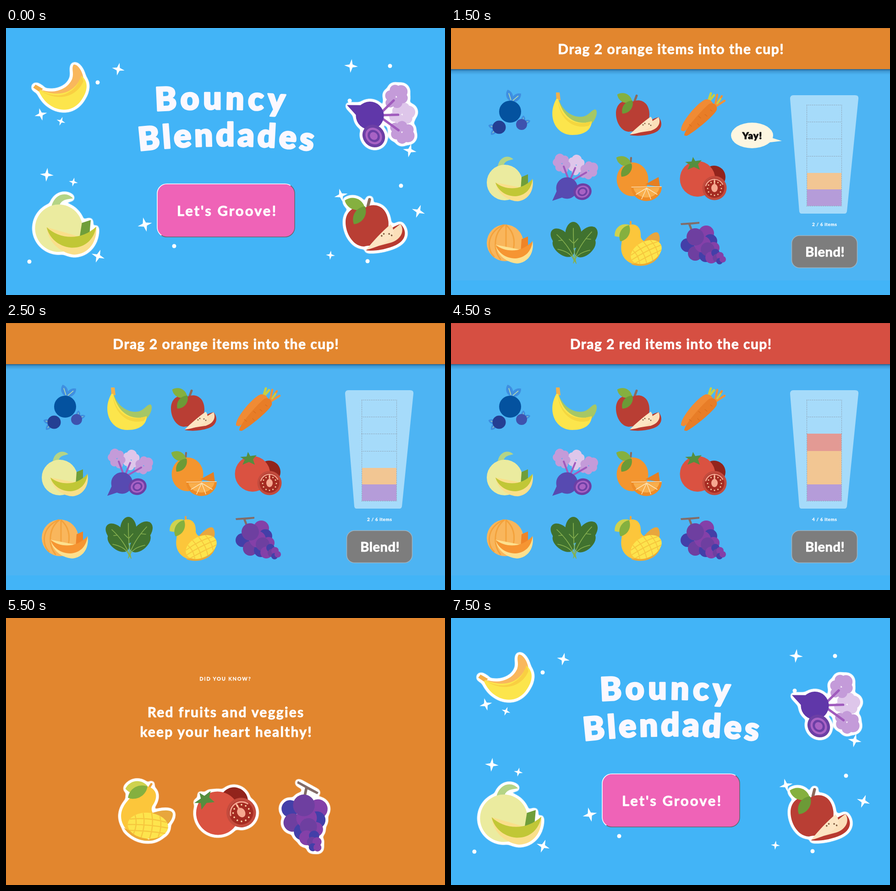
An HTML page that plays this animation: 958 px wide and 584 px high, repeating every 8 s.

```html
<!DOCTYPE html>
<html lang="en">
<head>
<meta charset="utf-8">
<title>Bouncy Blendades</title>
<style>
  html, body { margin: 0; width: 100%; height: 100%; overflow: hidden; background: #42b4f7; }
  svg { display: block; width: 958px; height: 584px; }
  text { font-family: Lato, sans-serif; font-weight: 700; text-anchor: middle;
         fill: #fff; stroke: #fff; stroke-width: .9; stroke-linejoin: round; }
  .title { font-size: 71px; font-weight: 900; fill: #fbf8fe; stroke: #fbf8fe; stroke-width: 3; }
  .small { stroke-width: .3; }
  .speech { font-weight: 900; fill: #111; stroke: #111; }
  .sticker { filter: url(#sticker); }
  .line { fill: none; stroke-linecap: round; }
</style>
</head>
<body>
<svg id="stage" viewBox="0 0 958 584"></svg>
<script>
const ORANGE = '#e2862e', WHITE = '#fff';

// Drawing helpers
const path = (d, fill, extra = '') => `<path d="${d}" fill="${fill}" ${extra}/>`;
const line = (d, color, width) => `<path class="line" d="${d}" stroke="${color}" stroke-width="${width}"/>`;
const ellipse = (x, y, rx, ry, fill, turn = 0) =>
  `<ellipse rx="${rx}" ry="${ry}" fill="${fill}" transform="translate(${x} ${y}) rotate(${turn})"/>`;
const circle = (x, y, r, fill) => ellipse(x, y, r, r, fill);
const rect = (x, y, w, h, fill, extra = '') =>
  `<rect x="${x}" y="${y}" width="${w}" height="${h}" fill="${fill}" ${extra}/>`;
const at = (x, y, turn, scale, body) =>
  `<g transform="translate(${x} ${y}) rotate(${turn}) scale(${scale})">${body}</g>`;
const text = (x, y, size, spacing, words, extra = '') =>
  `<text x="${x + spacing / 2}" y="${y}" font-size="${size}" letter-spacing="${spacing}" ${extra}>${words}</text>`;
const place = (id, x, y, turn = 0, scale = 1, style = '') =>
  at(x, y, turn, scale, `<use href="#${id}" style="${style}"/>`);
const sticker = (...args) => `<g class="sticker">${place(...args)}</g>`;
const star = ([x, y, r], i) =>
  at(x, y, [12, -14, 20, 6][i % 4], r, path('M0-1L.2-.24L1 0L.24.2L0 1L-.2.24L-1 0L-.24-.2Z', WHITE));
const leaf = (x, y, turn, half, width, fill) =>
  at(x, y, turn, 1, path(`M${-half} 0C${-half / 2} ${-width} ${half / 2} ${-width} ${half} 0C${half / 2} ${width} ${-half / 2} ${width} ${-half} 0Z`, fill));
const button = (x, y, w, h, r, fill, stroke) =>
  rect(x, y, w, h, fill, `rx="${r}" stroke="${stroke}" stroke-width="1.6"`);

// Produce, each drawn around its own centre
function blueberries() {
  const sprig = (x, y, turn, size) => at(x, y, turn, size,
    [-34, 34].map(a => at(0, 0, a, 1, leaf(0, -13, 90, 13, 9, '#3f8fe0') + line('M0-4V-18', '#b9dcae', 1.6))).join(''));
  return sprig(4, -26, 16, 1.05) + sprig(-28, 32, -105, .75) + sprig(29, 21, 38, .65) +
    circle(1, -4, 24, '#04529f') + circle(-23, 30, 14.5, '#243f93') + circle(26, 24, 12, '#3e52ae');
}

function banana() {
  return path('M-40-46h8l2 17h-9z', '#f3b04a') +
    path('M-34-32C-26-4 0 12 22 6C34 2 37-8 46-9C52-6 49 10 38 22C10 34-30 22-34-32Z', 'var(--back,#a6c765)') +
    path('M-39-32C-60 5-42 47-4 47C24 47 38 34 38 17C20 24-20 25-35-32Z', '#fce54c') +
    path('M-36-32C-30 10-4 22 20 21L38 17L32 27C-4 36-34 10-36-32Z', 'var(--shade,#f4d63f)');
}

const leafPair = (x, y) => leaf(x, y, 25, 18, 13, '#85b03f') + leaf(x + 6, y + 20, -52, 18, 12, '#6c9a37');

function apple() {
  return line('M-9-28L-5-39', '#8b6a5c', 5) +
    path('M-14-26C4-34 23-24 23 2C22 26 8 43-6 41C-12 39-17 39-22 40C-38 39-50 20-50 0C-50-23-32-33-14-26Z', '#b93e34') +
    leafPair(-31, -34) +
    path('M-20 47C0 30 24 12 43 8C53 20 51 36 32 43C15 49-6 50-20 47Z', '#b83a30') +
    path('M-14 44L43 8C49 20 42 34 24 38Z', '#fbdfb9') +
    path('M-20 46C-6 32 10 18 26 7C31 14 30 20 29 26C16 38-2 44-20 46Z', '#fde5c3') +
    [[9, 25], [13, 22], [22, 23], [26, 26]].map(([x, y]) => circle(x, y, 1.4, '#7e5a3d')).join('');
}

function carrots() {
  return line('M12-28L17-44M14-28L24-40', '#c9cf42', 5) +
    line('M26-16L31-41M27-16L41-38M27-15L47-28', '#f0923b', 4.5) + line('M31-22L38-32', '#c9cf42', 4) +
    path('M-48 37C-50 20-10-26 6-31C16-32 24-24 22-14C18 0-30 32-42 39Z', '#f08b34') +
    path('M-41 48C-42 36-5-5 12-20C22-27 32-18 30-8C24 6-24 44-36 49Z', '#e87d27') +
    line('M-10 6l5 4M-30 24l5 4M4 2l5 4M-12 22l4 4M16-8l4 3', '#d96e1d', 1.3);
}

const melonSlice = (dy, rind, flesh, end) => at(0, dy, 0, 1,
  path('M26-2L40-8V16L24 26Z', end) +
  path('M-31 10C-26 38 0 51 18 51C42 48 54 26 50 2C46 10 40 18 30 22Z', rind) +
  path('M-31 10C-10 27 26 29 50 2C48 24 34 39 12 40C-10 40-26 26-31 10Z', flesh));

function honeydew() {
  return path('M-26-26C-22-46-4-52 8-41C-2-38-10-38-13-28Z', '#b4d486') +
    circle(-11, 10, 39, '#ebeb9f') + melonSlice(0, '#fadf8a', '#c1c736', '#6f9e3a');
}

function cantaloupe() {
  return circle(-10, 0, 40, '#f9b65c') +
    line('M-12-39C-36-20-36 16-20 36M-8-39C14-20 14 10 0 34M-14-39C-54-20-48 18-34 30M-8-39V36', '#f3a23c', 3) +
    melonSlice(-6, '#fde08e', '#f69532', '#ef8427');
}

function beet() {
  const cloud = (x, y, turn, fill) => at(x, y, turn, 1,
    [[0, -12, 11], [-9, -7, 9], [9, -6, 9], [-8, 5, 9], [8, 6, 9], [0, 14, 8]].map(c => circle(...c, fill)).join(''));
  const root = 'var(--root,#574ab1)';
  return cloud(4, -28, 6, '#dec6ea') + cloud(-27, -31, -22, '#c49bd9') + cloud(31, -16, 56, '#c49bd9') +
    line('M-13 2L-23-25M-8 2L2-22M-5 6L26-12', '#a05bbd', 4) +
    path('M-38 28L-48 50L-24 42Z', root) + circle(-16, 22, 23.5, root) +
    ellipse(18, 30, 20, 18, '#6c3fa5', -20) + ellipse(18, 30, 15, 13, '#a862c4', -20) +
    ellipse(18, 30, 11, 9.5, '#6c3fa5', -20) + ellipse(18, 30, 7, 6, '#a862c4', -20);
}

function orange() {
  return line('M-18-33L-17-44', '#8b6a5c', 4) + ellipse(-14, 3, 34.5, 37, '#f3952f') + leafPair(-33, -37) +
    path('M14 14L43-2L46 20Z', '#e67f22') +
    path('M-17 20A33.5 31 0 0 0 50 19Z', '#ee8b26') + path('M-12 22A29 26 0 0 0 45 21Z', '#f9ae4c') +
    line('M17 22L-6 36M17 22L6 46M17 22L26 46M17 22L40 36M-16 20L49 19', '#fde3b4', 1.5);
}

function tomato() {
  let seeds = '';
  for (let i = 0; i < 12; i++) {
    const a = i * Math.PI / 6;
    seeds += circle(25 + 15 * Math.cos(a), 23 + 15 * Math.sin(a), 1.5, '#fbd3a8');
  }
  return circle(24, -2, 25, '#92241c') + ellipse(-12, 2, 38.5, 39, '#da5241') +
    path('M-22-46L-17-37L-3-39L-11-30L-7-18L-20-24L-34-18L-29-29L-39-35L-25-36Z', '#558e3e') +
    circle(25, 22, 26.5, '#c34b3d') + circle(25, 22, 21.5, '#a52b22') +
    line('M6 17A20 20 0 0 1 43 14', '#f3a08c', 2.5) + line('M25 22V4', '#f6a890', 3) +
    ellipse(25, 22, 7, 9, '#f6a890') + seeds;
}

function spinach() {
  const leaves = [[-24, 10, -52, 16, 27], [24, 10, 48, 16, 27], [-29, -9, -45, 17, 27], [28, -12, 42, 18, 28], [-2, -17, 0, 18, 29]];
  return leaves.map(([x, y, turn, rx, ry]) => ellipse(x, y, rx, ry, '#40722f', turn)).join('') +
    line('M-2-32Q-2 20 4 45M-38-18Q-8 10 2 42M38-24Q8 8-2 44M-36 14Q-6 20 0 40M34 16Q6 22 0 40M-3 0l-8-8M0 0l8-9M26-9l10 1M-26-6l-8 1', '#86b04f', 1.7);
}

function mango() {
  return line('M-18-46V-36', '#f0a33d', 4) + path('M8 0C20-16 40-32 44-18C48-8 44 6 36 12Z', '#e8a63d') +
    path('M-18-40C-2-42 5-30 4-14C6 0 24 0 42 0C52 16 30 48 6 49C-30 48-42 26-38 2C-36-10-34-34-18-40Z', '#fcc63b') +
    leaf(-37, -27, -38, 20, 15, '#cfd24e') + leaf(-31, -21, -62, 20, 13, '#85b03f') +
    path('M-18 46C10 58 46 44 48 14L30 40Z', '#eda934') +
    at(16, 20, -27, 1, ellipse(0, 0, 36, 23, '#fde44d') +
      line('M-24-16Q-18 0-24 16M-10-21Q-4 0-10 21M5-22Q11 0 5 22M20-18Q26 0 20 18M-32-9Q0-15 32-9M-35 1Q0-3 35 1M-31 11Q0 9 31 11', '#f6c63d', 2));
}

function grapes() {
  const tones = ['#8440a8', '#6e3fa0', '#433fa8'];
  const bunch = [[7, -21, 17, 0], [-34, 5, 15, 2], [16, -4, 15, 2], [-17, 23, 16, 1], [23, 11, 13, 0], [6, 27, 15, 2], [-1, 3, 18, 0],
    [-17, -13, 19, 1], [10, 14, 15, 1], [18, 32, 13, 0], [27, 22, 9, 2], [30, 33, 9, 1], [37, 28, 8, 0], [36, 40, 7, 2], [43, 36, 7, 0]];
  return path('M-49-43L-8-46V-42L-27-40L-22-27H-27L-32-40L-48-39Z', '#826c68') +
    bunch.map(([x, y, r, tone]) => circle(x, y, r, tones[tone])).join('');
}

const produce = { blueberries, banana, apple, carrots, honeydew, beet, orange, tomato, cantaloupe, spinach, mango, grapes };
const ripe = '--back:#f9b75c;--shade:#f9cf42';

// Scenes
function titleScene() {
  const stars = [[245, 90, 14], [76, 189, 14], [120, 204, 10], [89, 321, 15], [147, 337, 10], [303, 430, 16], [201, 499, 15],
    [753, 83, 15], [881, 268, 15], [731, 366, 15], [900, 401, 15], [708, 497, 10]];
  const dots = [[200, 119], [750, 159], [838, 83], [51, 511], [367, 477], [789, 510], [862, 345]];
  const arc = (id, spacing, words) =>
    `<text class="title" letter-spacing="${spacing}"><textPath href="#${id}" startOffset="50%">${words}</textPath></text>`;
  return rect(0, 0, 958, 584, '#42b4f7') + stars.map(star).join('') + dots.map(([x, y]) => circle(x, y, 4.5, WHITE)).join('') +
    sticker('banana', 125, 126, -53, 1.08, ripe) + sticker('beet', 828.6, 199, 66, 1.3, '--root:#6037a9') +
    sticker('honeydew', 131, 426, 5, 1.33) + sticker('apple', 805, 424, -6, 1.28) +
    arc('upper', 8, 'Bouncy') + arc('lower', 6, 'Blendades') +
    button(330, 341, 300, 116, 21, '#ef63b7', 'url(#bevel)') + text(481, 411, 31, 3, 'Let\'s Groove!');
}

function gameScene({ color, name, fills, bubble = '', shift = 0 }) {
  const rows = [168, 205, 242, 280, 317, 353, 389];
  const filled = fills.map((fill, i) => rect(777, rows[5 - i], 75, rows[6 - i] - rows[5 - i], fill)).join('');
  const grid = rows.map(y => `M776 ${y}.5H853`).join('') + 'M776.5 168V389M852.5 168V389';
  const cells = Object.keys(produce).map((id, i) =>
    place(id, [128, 269, 410, 550][i % 4], [187, 328, 470][Math.floor(i / 4)])).join('');
  const cup = path('M747 147H882Q890 147 889 155L864 401Q863 406 859 406H765Q761 406 760 401L740 155Q740 147 747 147Z', '#a6dbfa') +
    `<path d="${grid}" fill="none" stroke="#8996a5" stroke-dasharray="2 2"/>` + filled +
    text(815, 433, 10, .6, `${fills.length} / 6 items`, 'class="small"') +
    button(743.5, 454, 143, 70.5, 17, '#7d7d7d', '#9cb4c4') + text(816, 500, 29, .6, 'Blend!');
  return rect(0, 0, 958, 584, '#42b4f7') + rect(0, 0, 958, 552, '#4db4f3') +
    rect(0, 90, 958, 12, 'url(#shadow)') + rect(0, 0, 958, 90, color) + rect(0, 0, 958, 1, '#000', 'opacity=".12"') +
    text(479.5, 57, 30, 1.5, `Drag 2 ${name} items into the cup!`) + cells + at(shift, 0, 0, 1, cup) + bubble;
}

const speech = (y, tipX, tipY) => path(`M696 ${y + 4}L${tipX} ${tipY}L688 ${y + 16}Z`, '#fdf6e1') + ellipse(657, y, 46, 28, '#fdf6e1');
const yay = speech(235, 722, 247) + text(657, 243, 21, 1, 'Yay!', 'class="speech"');
const aww = speech(237, 721, 256) + at(657, 245, 5, 1, text(0, 0, 20, .7, 'Aww...', 'class="speech"')) +
  path('M704 272Q712 278 722 274Q718 286 711 290Z', '#d9564d') + ellipse(689, 287, 24, 21.5, '#e4625a', -20) +
  circle(687, 288, 11, '#fdf3e6') + circle(682.5, 286, 1.8, '#222') + circle(691.5, 286, 1.8, '#222') +
  line('M683.5 294Q687 289.5 690.5 294', '#222', 1.5);

function factScene() {
  return rect(0, 0, 958, 584, ORANGE) + text(478, 137, 11, 1.8, 'DID YOU KNOW?', 'class="small"') +
    text(479, 217, 30, 2.3, 'Red fruits and veggies') + text(479.5, 260, 30, 2.2, 'keep your heart healthy!') +
    sticker('mango', 306, 423, 32, 1.23) + sticker('tomato', 473.5, 417.6, -30, 1.22) + sticker('grapes', 659, 435, 33, 1.25);
}

function finaleScene() {
  const stars = [[76, 132, 12], [116, 145, 8], [182, 132, 8], [141, 201, 12], [87, 262, 12], [105, 352, 13], [151, 366, 8], [203, 500, 13],
    [129, 542, 13], [756, 209, 13], [881, 165, 13], [843, 283, 13], [713, 399, 13], [856, 428, 13], [681, 509, 8], [834, 542, 13]];
  const dots = [[193, 70], [177, 234], [67, 302], [72, 509], [731, 94], [881, 233], [755, 288], [824, 380], [762, 520]];
  const drop = (x, y, turn, size) => at(x, y, turn, size, path('M0 0L-6.5-36A6.6 7 0 1 1 6.5-36Z', WHITE));
  return rect(0, 0, 958, 584, '#e99ab2') + stars.map(star).join('') + dots.map(([x, y]) => circle(x, y, 3.7, WHITE)).join('') +
    place('banana', 119.6, 73.4, -22, .94, ripe) + place('beet', 802.5, 114.5, 32, 1.13) +
    place('honeydew', 124.5, 439, -20, 1.08) + place('apple', 788, 447, 26) +
    text(479.5, 60, 30, 2, 'Here\'s your Bouncy Blendade!') +
    drop(444, 165, -36, 1) + drop(467, 152, -14, 1.05) + drop(512, 165, 43, .92) +
    path('M410 199H551Q559 199 558 207L538 430Q537 434 533 434H421Q417 434 417 430L403 207Q402 199 410 199Z', '#f6ecee') +
    path('M427 215H530Q535 215 535 220L534 262H422V220Q422 215 427 215Z', '#fdf6fd') +
    path('M422 261C432 270 442 275 448 271C456 263 446 241 457 237C475 235 504 255 534 256L523 420L433 418Z', '#a36c37') +
    button(376.5, 474, 203, 58.5, 19, '#ef7dba', 'url(#softBevel)') + text(478.5, 509, 18, .4, 'Blend another!');
}

const bevel = (id, light, dark) => `<linearGradient id="${id}" x2="1" y2="1">
  <stop offset=".5" stop-color="${light}"/><stop offset=".5" stop-color="${dark}"/></linearGradient>`;
const defs = `<defs>
  <filter id="sticker" x="-20%" y="-20%" width="140%" height="140%" color-interpolation-filters="sRGB">
    <feGaussianBlur in="SourceAlpha" stdDeviation="4.5"/>
    <feColorMatrix values="0 0 0 0 1  0 0 0 0 1  0 0 0 0 1  0 0 0 20 -.7" result="rim"/>
    <feMerge><feMergeNode in="rim"/><feMergeNode in="SourceGraphic"/></feMerge>
  </filter>
  ${bevel('bevel', '#fff', '#6b6470')}${bevel('softBevel', '#c9a3c4', '#6b6470')}
  <linearGradient id="shadow" x2="0" y2="1">
    <stop stop-color="#123a60" stop-opacity=".7"/><stop offset=".35" stop-color="#1b568a" stop-opacity=".3"/>
    <stop offset="1" stop-color="#1b568a" stop-opacity="0"/>
  </linearGradient>
  <path id="upper" d="M305 183Q470 172 637 185"/>
  <path id="lower" d="M265 272Q483 244 701 273"/>
  ${Object.entries(produce).map(([id, draw]) => `<g id="${id}">${draw()}</g>`).join('')}
</defs>`;

const purpleFill = '#b59cd9', orangeFill = '#f2c693', redFill = '#e39a94';
const orangeRound = { color: ORANGE, name: 'orange', fills: [purpleFill, orangeFill] };
const title = titleScene();
const timeline = [
  [0, title],
  [500, gameScene({ color: '#7b4fb3', name: 'purple', fills: [] })],
  [1500, gameScene({ ...orangeRound, bubble: yay })],
  [2500, gameScene(orangeRound)],
  [3500, gameScene({ ...orangeRound, bubble: aww, shift: -1 })],
  [4500, gameScene({ color: '#d64f42', name: 'red', fills: [purpleFill, orangeFill, orangeFill, redFill] })],
  [5500, factScene()],
  [6500, finaleScene()],
  [7500, title],
];

const stage = document.getElementById('stage');
stage.innerHTML = defs + timeline.map(([, scene]) => `<g class="scene" display="none">${scene}</g>`).join('');
const scenes = [...stage.querySelectorAll('.scene')];
const start = performance.now();

function tick() {
  const time = (performance.now() - start) % 8000;
  const current = timeline.filter(([from]) => from <= time).length - 1;
  scenes.forEach((scene, i) => scene.setAttribute('display', i === current ? 'inline' : 'none'));
  requestAnimationFrame(tick);
}
tick();
</script>
</body>
</html>
```
